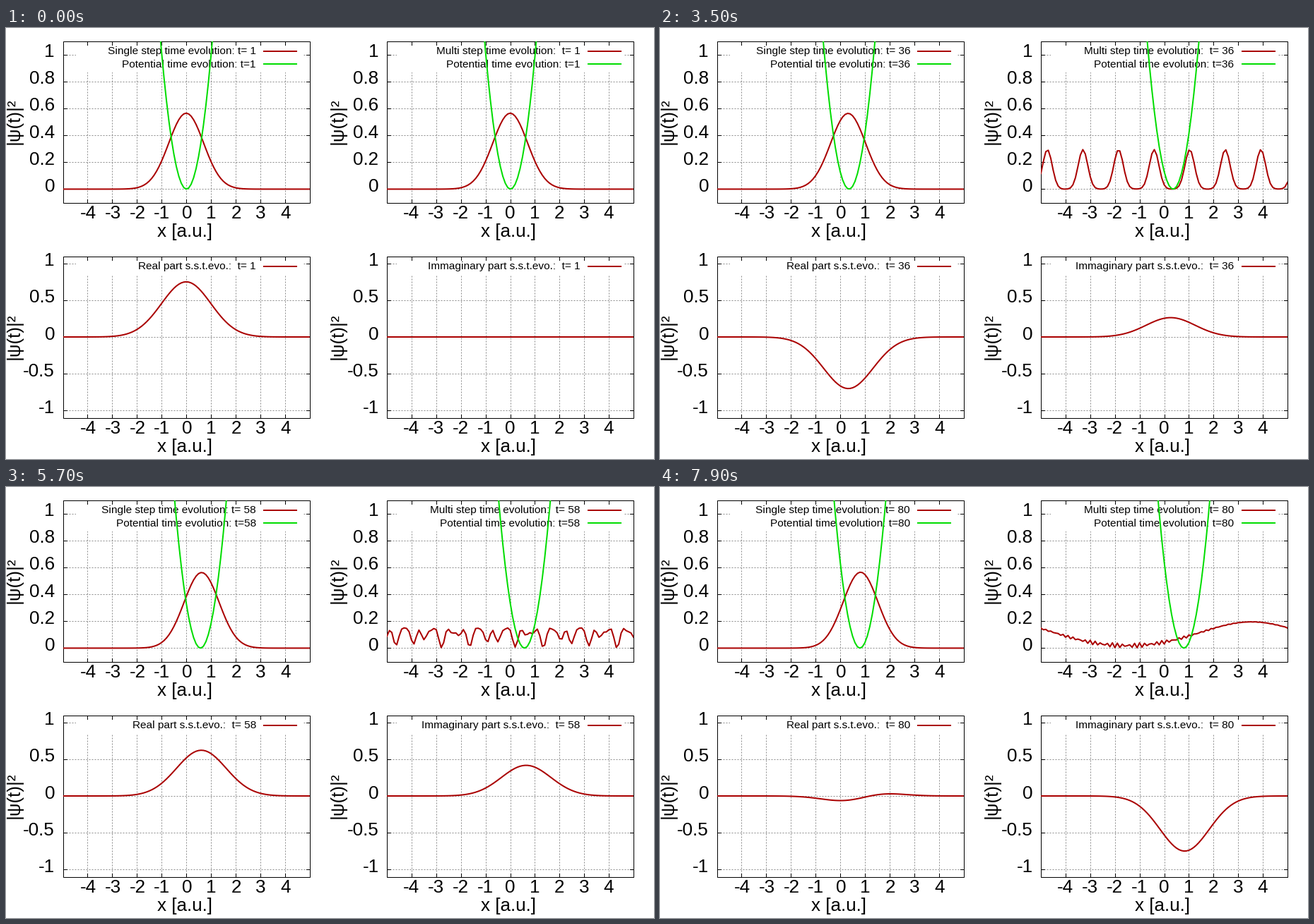
A matplotlib script for the animation above (8000 ms loop, 917 px wide and 611 px high).

```python
import numpy as np
import matplotlib.pyplot as plt
from matplotlib.animation import FuncAnimation
from matplotlib.patches import Rectangle

W, H, DPI = 917, 611, 100
STEPS, DT, DRIFT = 80, 0.1, 0.01
RED, GREEN, GREY = "#aa0000", "#00dd00", "#8c8c8c"
PX = 72 / DPI
TICK_SIZE, KEY_SIZE = 26 * PX, 15.4 * PX
BOX_W, BOX_H = 349, 229

plt.rcParams["font.family"] = ["Liberation Sans", "DejaVu Sans"]

# Split-operator evolution of a Gaussian in a slowly moving harmonic well.
N = 101
x = np.linspace(-5, 5, N)
k = 2 * np.pi * np.fft.fftfreq(N, x[1] - x[0])
ground = np.pi ** -0.25 * np.exp(-x ** 2 / 2)


def well(n):
    return (x - DRIFT * n) ** 2


def evolve(psi, v, t):
    kick = np.exp(-0.5j * v * t)
    return kick * np.fft.ifft(np.exp(-1j * k ** 2 * t) * np.fft.fft(kick * psi))


small_steps = [ground.astype(complex)]
for n in range(2, STEPS + 1):
    small_steps.append(evolve(small_steps[-1], well(n), DT))
big_steps = [evolve(ground, well(n), n * DT) for n in range(1, STEPS + 1)]

fig = plt.figure(figsize=(W / DPI, H / DPI), dpi=DPI, facecolor="white")
ax = fig.add_axes([0, 0, 1, 1])
ax.set_xlim(0, W)
ax.set_ylim(H, 0)
ax.axis("off")


def line(xs, ys, color, width, **kw):
    return ax.plot(xs, ys, color=color, lw=width * PX, **kw)[0]


def label(px, py, s, size=TICK_SIZE, ha="center", **kw):
    return ax.text(px, py, s, fontsize=size, ha=ha, va="baseline", **kw)


class Panel:
    def __init__(self, left, top, ymax, ymin, yticks, keys, shift):
        self.left, self.top, self.ymax = left + 0.5, top + 0.5, ymax
        self.scale = BOX_H / (ymax - ymin)
        self.clip = Rectangle((self.left, self.top), BOX_W, BOX_H,
                              transform=ax.transData)
        self.draw_frame(yticks, len(keys), shift)
        self.keys, self.curves = [], []
        for row, (text, color) in enumerate(keys):
            y = self.top + 14 + 18.5 * row
            item = label(self.left + 273.5, y + 4.7, "", KEY_SIZE, "right", zorder=4)
            self.keys.append((item, text))
            line([self.left + 284.5, self.left + 330.5], [y, y], color, 2, zorder=4)
            curve = line([], [], color, 2, zorder=5 + row)
            curve.set_clip_path(self.clip)
            self.curves.append(curve)

    def px(self, v):
        return self.left + BOX_W * (np.asarray(v) + 5) / 10

    def py(self, v):
        return self.top + (self.ymax - np.asarray(v)) * self.scale

    def draw_frame(self, yticks, rows, shift):
        l, t = self.left, self.top
        r, b = l + BOX_W, t + BOX_H
        dots = dict(ls=(0, (2, 2)), dash_capstyle="butt", zorder=1)
        for v in range(-4, 5):
            p = self.px(v)
            line([p, p], [b, t], GREY, 1, **dots)
            line([p, p], [b, b - 5], "black", 1, zorder=3)
            line([p, p], [t, t + 5], "black", 1, zorder=3)
            label(p + shift, b + 22.5, str(v))
        for v in yticks:
            p = self.py(v)
            line([l, r], [p, p], GREY, 1, **dots)
            line([l, l + 5], [p, p], "black", 1, zorder=3)
            line([r, r - 5], [p, p], "black", 1, zorder=3)
            label(l - 11.5, p + 3.5, f"{v:g}", ha="right")
        # The key hides the grid behind it.
        ax.add_patch(Rectangle((l + 18 - 4 * (shift < 0), t + 6), 321,
                               20 + 18.5 * (rows - 1), fc="white", lw=0, zorder=2))
        ax.add_patch(Rectangle((l, t), BOX_W, BOX_H, fill=False, ec="black",
                               lw=PX, zorder=3))
        label(l + 172, b + 48.5, "x [a.u.]")
        ax.text(l - 62, t + 113.5, "|ψ(t)|²", fontsize=TICK_SIZE, rotation=90,
                rotation_mode="anchor", ha="center", va="baseline")

    def update(self, n, *data):
        for (item, text), curve, ys in zip(self.keys, self.curves, data):
            item.set_text(text + str(n))
            curve.set_data(self.px(x), self.py(ys))


density_ticks = (0, 0.2, 0.4, 0.6, 0.8, 1)
wave_ticks = (-1, -0.5, 0, 0.5, 1)
potential = ("Potential time evolution: t=", GREEN)

single = Panel(80, 18, 1.1, -0.1, density_ticks,
               [("Single step time evolution: t= ", RED), potential], 0.8)
multi = Panel(538.5, 18, 1.1, -0.1, density_ticks,
              [("Multi step time evolution:  t= ", RED), potential], -0.2)
real = Panel(80, 323, 1.1, -1.1, wave_ticks,
             [("Real part s.s.t.evo.:  t= ", RED)], 0.8)
imag = Panel(538.5, 323, 1.1, -1.1, wave_ticks,
             [("Immaginary part s.s.t.evo.:  t= ", RED)], -0.2)


def update(i):
    n, psi, v = i + 1, small_steps[i], well(i + 1)
    single.update(n, abs(psi) ** 2, v)
    multi.update(n, abs(big_steps[i]) ** 2, v)
    real.update(n, psi.real)
    imag.update(n, psi.imag)
    return []


anim = FuncAnimation(fig, update, frames=STEPS, interval=100, repeat=True,
                     repeat_delay=0, blit=False)
plt.show()
```
